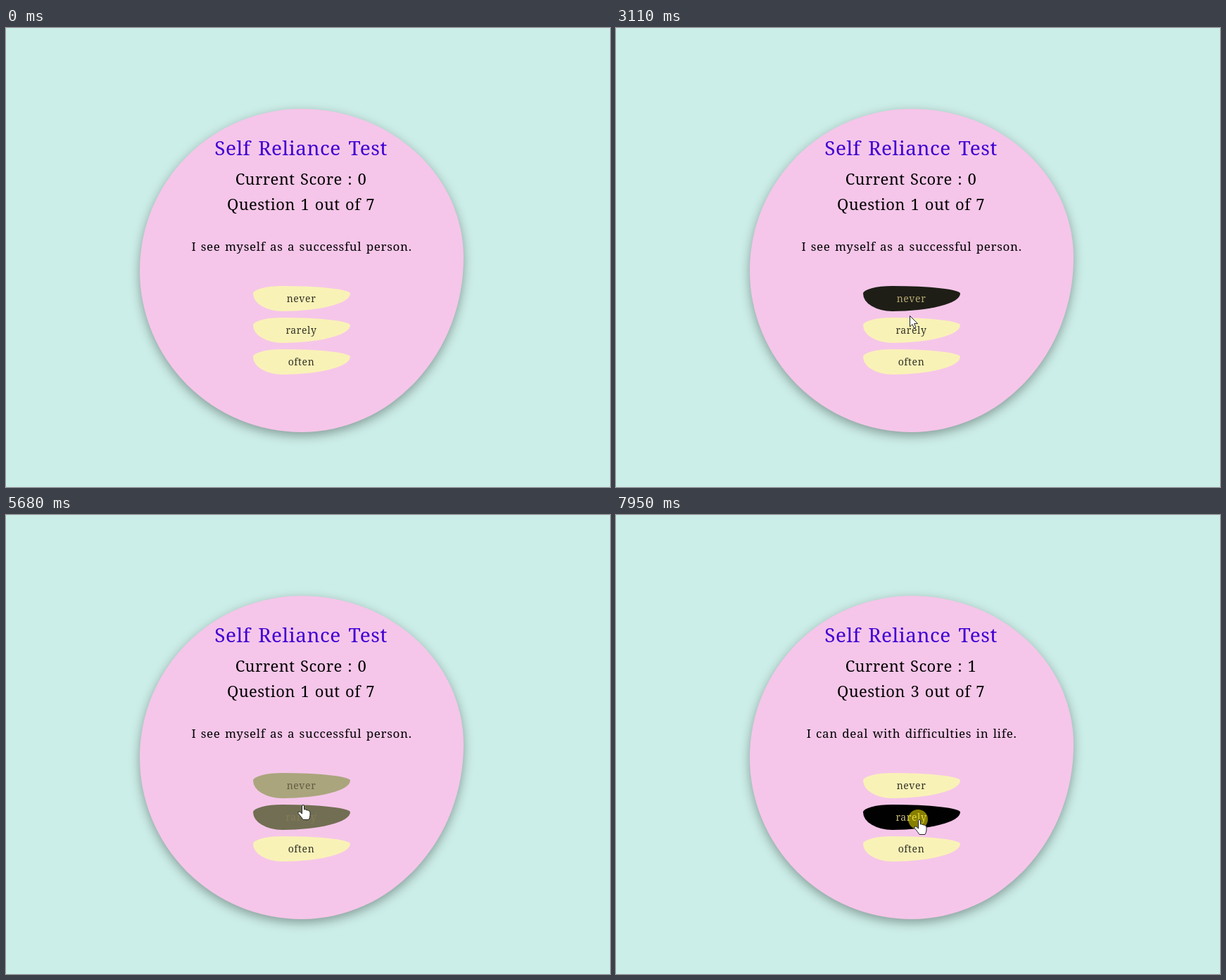
These frames come from a looping animation (858x653 px, 8 s). An HTML page:

```html
<!DOCTYPE html>
<html lang="en">
<head>
<meta charset="utf-8">
<title>Self Reliance Test</title>
<style>
  html, body { margin: 0; width: 100%; height: 100%; overflow: hidden; background: #cceee8; }
  div, svg { position: absolute; }
  #disc {
    left: 190px; top: 115px; width: 460px; height: 460px; background: #f5c6e9;
    border-radius: 50% / 50% 46% 54% 50%;
    box-shadow: 0 5px 15px rgba(0, 0, 0, .35);
  }
  .button {
    left: 351px; width: 138px; height: 36px;
    border-radius: 30% 70% 70% 30% / 30% 30% 70% 70%;
  }
  svg { left: 0; top: 0; }
  text { font-family: "Noto Serif", "Liberation Serif", serif; text-anchor: middle; }
  #title { font-size: 28px; letter-spacing: .5px; word-spacing: 3px; fill: #3f00d2; }
  .info { font-size: 22px; letter-spacing: .4px; word-spacing: 1.5px; }
  .prompt { font-size: 17px; letter-spacing: .67px; word-spacing: 1.3px; }
  .label { font-size: 14px; font-weight: 300; letter-spacing: .6px; fill-opacity: .8; }
</style>
</head>
<body>
<div id="disc"></div>
<div class="button"></div>
<div class="button"></div>
<div class="button"></div>
<svg width="858" height="653">
  <text id="title" x="419" y="181">Self Reliance Test</text>
  <text class="info" id="score" x="419" y="223"></text>
  <text class="info" id="count" x="419" y="259"></text>
  <text class="prompt" x="420" y="317"></text>
  <text class="prompt" x="420" y="338"></text>
  <text class="label" x="419.5">never</text>
  <text class="label" x="419.5">rarely</text>
  <text class="label" x="419.5">often</text>
  <g id="pointer">
    <circle id="click" r="14" fill="#fff000" opacity=".53"/>
    <path id="arrow" d="M.5 .5V16L4 12.6L6.4 18L9 16.9L6.6 11.6H11.5Z" fill="#fff" stroke="#222"/>
    <path id="beam" d="M-3 -7.5H-1L0 -6.5L1 -7.5H3M0 -6.5V6.5M-3 7.5H-1L0 6.5L1 7.5H3" fill="none" stroke="#555"/>
    <path id="hand" d="M.5 13V2Q.5 .5 2 .5T3.5 2V7Q6.5 6 7 8Q9.5 7 10.2 9Q12 8.6 12 11V15Q12 18 10 21.5H2Q0 18-5 12.4Q-5.6 10.2-3.6 10Q-1.5 10.6 .5 13Z" fill="#fff" stroke="#222"/>
  </g>
</svg>
<script>
const LOOP = 8000, STEP = 10, FADE = 600, ENTER = 70, PRESS = 130;
const $ = id => document.getElementById(id);
const all = selector => [...document.querySelectorAll(selector)];
const buttons = all('.button'), labels = all('.label'), prompts = all('.prompt');
const texts = [$('title'), $('score'), $('count'), ...prompts];

const pages = [
  { score: 0, lines: ['I see myself as a successful person.'] },
  { score: 0, lines: ['I can control my excitement around other', 'people.'] },
  { score: 1, lines: ['I can deal with difficulties in life.'] }
];
const clicks = [5950, 6970, 7900];

// The pointer comes in, circles over the text, then moves up and down the buttons.
const ARC_START = 900, ARC_END = 2350;
const entry = [[ENTER, 800, 640], [550, 400, 395], [780, 420, 380], [ARC_START, 444, 343]];
const visits = [
  [ARC_END, 343], [2500, 385], [2800, 385], [3110, 409], [3600, 486], [3970, 486],
  [4230, 441], [4450, 390], [5350, 390], [5560, 424], [5850, 396], [6130, 396],
  [6250, 450], [6370, 427], [6700, 445], [7100, 445], [7300, 462], [7500, 433]
];

const mix = (a, b, k) => a + (b - a) * k;
const clamp = k => Math.min(1, Math.max(0, k));
const colour = (a, b, k) => `rgb(${a.map((v, i) => mix(v, b[i], k))})`;
const yellow = [249, 242, 183], black = [0, 0, 0], glow = [254, 234, 160];

// The standard "ease" timing curve
function ease(p) {
  if (p >= 1) return 1;
  let lo = 0, hi = 1, s;
  for (let i = 0; i < 16; i++) {
    s = (lo + hi) / 2;
    const x = .75 * s * (1 - s) ** 2 + .75 * s * s * (1 - s) + s ** 3;
    if (x < p) lo = s; else hi = s;
  }
  return .3 * s * (1 - s) ** 2 + 3 * s * s * (1 - s) + s ** 3;
}

function along(points, t) {
  const next = points.findIndex(p => p[0] > t);
  if (next < 0) return points.at(-1).slice(1);
  const [from, ...a] = points[Math.max(0, next - 1)];
  const [to, ...b] = points[next];
  const k = to > from ? clamp((t - from) / (to - from)) : 0;
  return a.map((v, i) => mix(v, b[i], k));
}

function position(t) {
  if (t < ARC_START) return along(entry, t);
  const angle = .705 - (Math.min(t, ARC_END) - 1040) * .0037;
  const arcX = 405 + 113 * Math.cos(angle);
  if (t < ARC_END) return [arcX, 250 + 99 * Math.sin(angle)];
  const sway = 422 + 8 * Math.cos((t - 4890) / 2800 * 2 * Math.PI);
  return [mix(arcX, sway, clamp((t - ARC_END) / 200)), ...along(visits, t)];
}

const pageAt = t => clicks.filter(c => c + PRESS <= t).length;
const buttonTop = (i, page) => 367 + 45 * i + 21 * (pages[page].lines.length - 1);

function hovered(t) {
  const [x, y] = position(t);
  return buttons.findIndex((_, i) => {
    const top = buttonTop(i, pageAt(t));
    return x > 351 && x < 489 && y > top && y < top + 36;
  });
}

// Run the hover transitions once through the loop.
function fadeTrack(i) {
  const track = [];
  let on = false, since = -FADE, base = 0, level = 0;
  for (let t = 0; t <= LOOP; t += STEP) {
    if ((hovered(t) === i) !== on) {
      on = !on;
      since = t;
      base = level;
    }
    level = mix(base, +on, ease((t - since) / FADE));
    track.push(level);
  }
  return track;
}
const tracks = buttons.map((_, i) => fadeTrack(i));

const show = (el, on) => el.style.display = on ? '' : 'none';

function drawPointer(t) {
  const [x, y] = position(t);
  const onButton = hovered(t) >= 0;
  const onText = texts.some(el => {
    const box = el.getBBox();
    return x > box.x && x < box.x + box.width && y > box.y && y < box.y + box.height;
  });
  show($('pointer'), t >= ENTER);
  $('pointer').setAttribute('transform', `translate(${Math.round(x)} ${Math.round(y)})`);
  show($('hand'), onButton);
  show($('beam'), !onButton && onText);
  show($('arrow'), !onButton && !onText);
  show($('click'), clicks.some(c => t >= c && t < c + PRESS));
}

function draw(t) {
  const page = pageAt(t);
  const { score, lines } = pages[page];
  $('score').textContent = `Current Score : ${score}`;
  $('count').textContent = `Question ${page + 1} out of 7`;
  prompts.forEach((el, i) => el.textContent = lines[i] || '');
  buttons.forEach((el, i) => {
    const top = buttonTop(i, page);
    const k = tracks[i][Math.floor(t / STEP)];
    el.style.top = top + 'px';
    el.style.background = colour(yellow, black, k);
    labels[i].setAttribute('y', top + 23);
    labels[i].style.fill = colour(black, glow, k);
  });
  drawPointer(t);
}

const begin = performance.now();
function tick() {
  draw((performance.now() - begin) % LOOP);
  requestAnimationFrame(tick);
}
tick();
</script>
</body>
</html>
```
